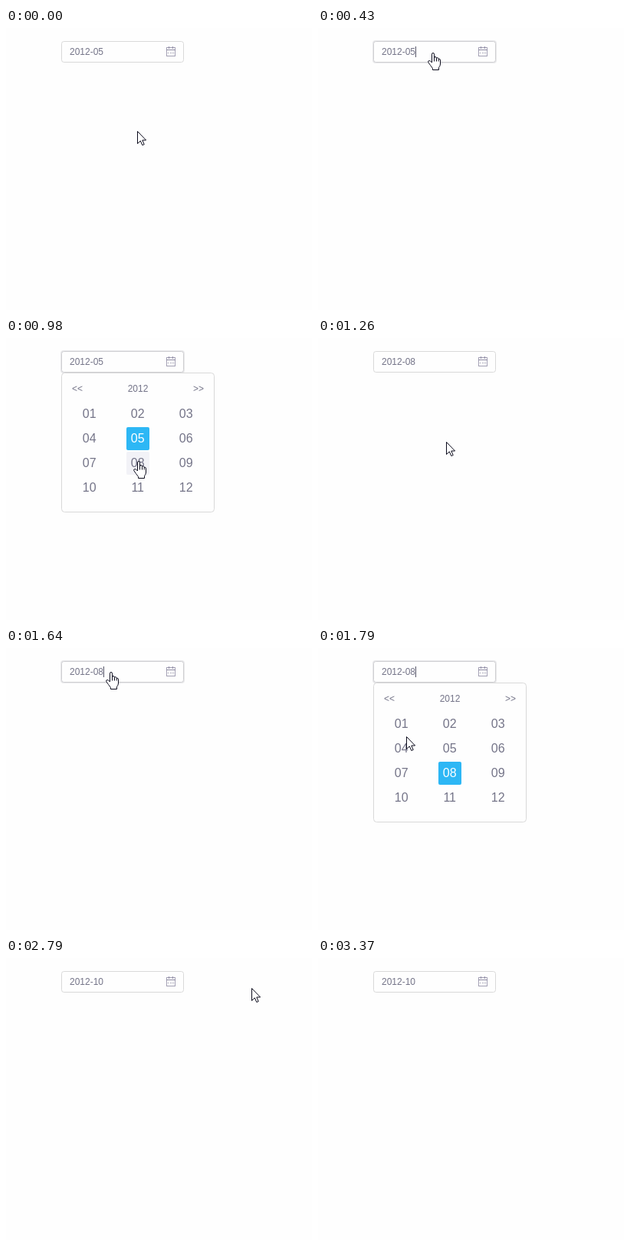
Write an HTML page with a canvas that moves like this. It is 399x367 px and loops after 3.51 s.

```html
<!DOCTYPE html>
<html lang="en">
<head>
<meta charset="utf-8">
<title>Month picker</title>
<style>
html, body { margin: 0; width: 100%; height: 100%; overflow: hidden; background: #fefefe; }
canvas { display: block; }
</style>
</head>
<body>
<canvas id="stage" width="399" height="367"></canvas>
<script>
const ctx = document.getElementById('stage').getContext('2d');
const LOOP = 3510;
const TEXT = '#747488', BORDER = '#d9d9d9', BLUE = '#2db7f5';

// Each step: start time, cursor shape, x, y, then any state that changes.
const steps = [
  [0, 'arrow', 171, 134, { month: 5, open: false, focus: false, caret: false, hover: 0 }],
  [150, 'arrow', 158, 88],
  [280, 'hand', 144, 40],
  [430, 'hand', 143, 32, { focus: true, caret: true }],
  [560, 'arrow', 152, 101, { open: true }],
  [710, 'hand', 168, 162, { hover: 8 }],
  [860, 'hand', 167, 170],
  [980, 'hand', 166, 160, { caret: false }],
  [1130, 'hand', 166, 160, { focus: false }],
  [1260, 'arrow', 167, 135, { open: false, month: 8, hover: 0 }],
  [1400, 'arrow', 146, 75],
  [1520, 'hand', 131, 34],
  [1640, 'hand', 130, 31, { focus: true, caret: true }],
  [1790, 'arrow', 115, 115, { open: true }],
  [1940, 'hand', 95, 182, { hover: 10 }],
  [2060, 'hand', 92, 200],
  [2210, 'hand', 97, 189, { focus: false, caret: false }],
  [2360, 'arrow', 104, 191, { open: false, month: 10, hover: 0 }],
  [2510, 'arrow', 205, 241],
  [2660, 'arrow', 272, 128],
  [2790, 'arrow', 320, 39],
  [2950, 'arrow', 380, 26],
  [3090, 'arrow', 388, 170],
  [3210, 'arrow', 392, 326],
  [3370, 'none', 0, 0]
];

const cursors = {
  arrow: new Path2D('M.5 .5V16.5L4.3 12.9 6.8 18.5 9.2 17.5 6.8 12H11.6Z'),
  hand: new Path2D(`M5.5 13V2.2Q5.5 .5 7 .5T8.5 2.2V7Q8.7 5.5 10 5.5T11.5 7.3
    Q12 6.5 13 6.7T14.2 8.3Q16.5 7.6 16.5 10V15Q16.3 17.5 14.5 19.5V22.5H6.5V20.5
    L3.5 16.5 .8 12.6Q.2 10.5 2.4 10.5Q4 11 5.5 13Z M8.5 7V11.5M11.5 7.3V11.5M14.2 8.3V11.5`)
};

const pad = n => String(n).padStart(2, '0');

function text(str, x, y, size = 12, align = 'left', color = TEXT) {
  ctx.font = `${size}px "Liberation Sans", Arial, sans-serif`;
  ctx.textAlign = align;
  ctx.fillStyle = color;
  ctx.fillText(str, x, y);
}

function box(x, y, w, h, radius, fill, stroke) {
  ctx.beginPath();
  ctx.roundRect(x, y, w, h, radius);
  ctx.fillStyle = fill;
  ctx.fill();
  if (stroke) {
    ctx.strokeStyle = stroke;
    ctx.stroke();
  }
}

function rect(x, y, w, h, color) {
  ctx.fillStyle = color;
  ctx.fillRect(x, y, w, h);
}

function drawCalendarIcon() {
  ctx.strokeStyle = '#a3a0b4';
  ctx.strokeRect(209.5, 25.5, 11, 11);
  rect(209, 28, 12, 1, '#8f8ca4');
  for (const x of [212, 217]) rect(x, 24, 1, 3, '#8f8ca4');
  for (const x of [211, 214, 216, 218]) rect(x, 32, 1, 1, '#8f8ca4');
}

function drawInput({ month, focus, caret }) {
  if (focus) box(71, 16, 162, 30, 4, '#e9e9eb');
  box(72.5, 17.5, 159, 27, 3, '#fefefe', focus ? '#cfcfd2' : BORDER);
  text(`2012-${pad(month)}`, 83, 35);
  if (caret) rect(127, 24, 1, 14, '#555568');
  drawCalendarIcon();
}

function drawPopup({ month, hover }) {
  box(72.5, 45.5, 199, 181, 4, '#fefefe', BORDER);
  text('<<', 86, 70);
  text('2012', 172, 70, 12, 'center');
  text('>>', 258, 70, 12, 'right');
  for (let m = 1; m <= 12; m++) {
    const x = 94 + (m - 1) % 3 * 63;
    const y = 84 + Math.floor((m - 1) / 3) * 32;
    const selected = m === month;
    if (selected || m === hover) box(x, y, 30, 30, 2, selected ? BLUE : '#f2f2f7');
    text(pad(m), x + 14.7, y + 20, 16, 'center', selected ? '#fff' : TEXT);
  }
}

function drawCursor(shape, x, y) {
  if (!cursors[shape]) return;
  ctx.save();
  ctx.translate(x, y);
  ctx.fillStyle = '#fff';
  ctx.fill(cursors[shape]);
  ctx.strokeStyle = '#0b0b1c';
  ctx.stroke(cursors[shape]);
  ctx.restore();
}

function draw(now) {
  const time = now % LOOP;
  const past = steps.filter(([start]) => start <= time);
  const state = Object.assign({}, ...past.map(step => step[4]));
  const [, shape, x, y] = past[past.length - 1];

  rect(0, 0, 399, 367, '#fefefe');
  drawInput(state);
  if (state.open) drawPopup(state);
  drawCursor(shape, x, y);
}

const began = performance.now();
function frame() {
  draw(performance.now() - began);
  requestAnimationFrame(frame);
}
frame();
</script>
</body>
</html>
```
